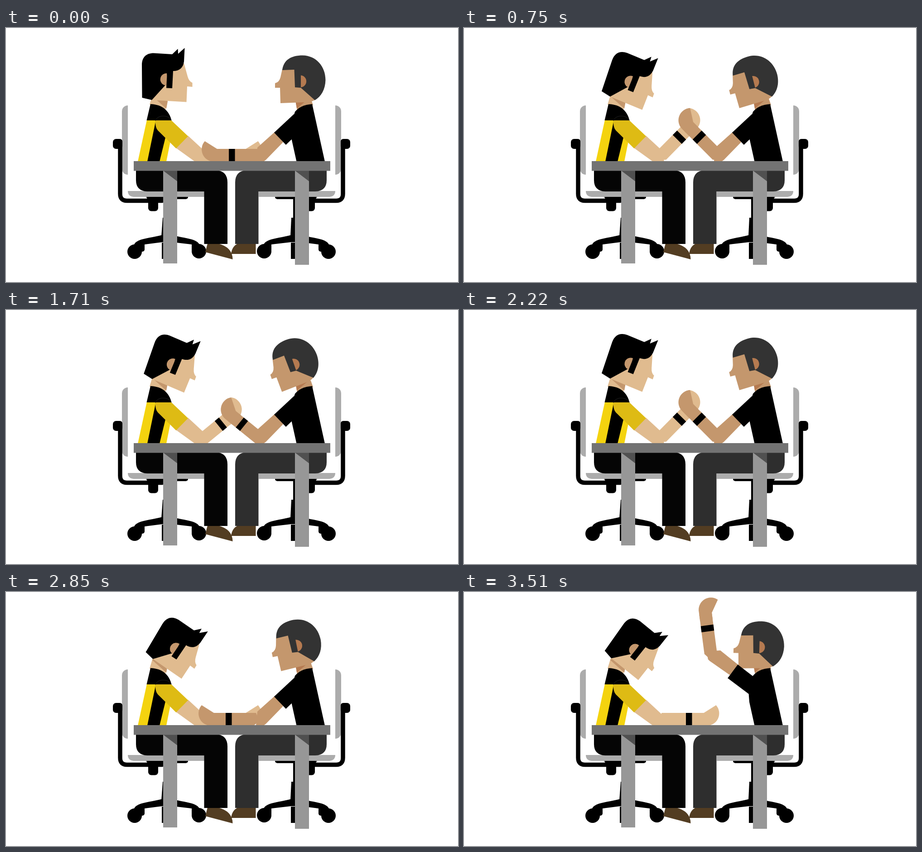
Animation of 998x561 px, one loop 3.63 s. Source, as an HTML page with a canvas:

```html
<!DOCTYPE html>
<html lang="en">
<head>
<meta charset="utf-8">
<title>Arm wrestling</title>
<style>
  html, body { margin: 0; width: 100%; height: 100%; overflow: hidden; background: #fff; }
  canvas { display: block; width: 100%; height: 100%; }
</style>
</head>
<body>
<canvas id="stage" width="998" height="561"></canvas>
<script>
const ctx = document.getElementById('stage').getContext('2d');
const LOOP = 3630, STEP = 30, LAST = 3510;
const BLACK = '#000', SEAT = '#acacac', SHOE = '#533d22';
const LIGHT = '#e0bb8f', TAN = '#c4976d', BROWN = '#b57a50';
const YELLOW = '#f4d30f', SLEEVE = '#debb14', GREY_HAIR = '#333';
const RAD = Math.PI / 180;
const HAND = { x: 110, y: 13 };
const SHOULDER = { x: 640, y: 203 };

const mix = (a, b, u) => a + (b - a) * u;

function ease(t, from, to) {
  const u = Math.min(1, Math.max(0, (t - from) / (to - from)));
  return u * u * (3 - 2 * u);
}

// Two fading nods while the grip is contested.
function struggle(t) {
  const u = Math.min(1, Math.max(0, (t - 1200) / 1020));
  return (1 - u) * Math.sin(2 * Math.PI * u) ** 2;
}

// Angle and length a forearm needs for its hand to meet a point dx ahead and dy above.
function reach(dx, dy) {
  return {
    lift: (Math.atan2(dy, dx) - Math.atan2(HAND.y, HAND.x)) / RAD,
    stretch: Math.hypot(dx, dy) / Math.hypot(HAND.x, HAND.y)
  };
}

function poseAt(t) {
  const lean = ease(t, 500, 755);
  const push = ease(t, 750, 1200) - ease(t, 1200, 2220);
  const sink = ease(t, 1200, 1710) - ease(t, 1710, 2220);
  const slam = ease(t, 2480, 2790);
  const raise = ease(t, 2880, 3240);
  const clasp = ease(t, 0, 660) - slam;
  const nod = struggle(t);

  const elbowY = 281 + 12 * clasp;
  const handY = mix(268, 205 + 17 * sink, clasp);
  const left = { x: 424.5, y: elbowY };
  const right = { x: 571 - 7 * slam + 10.5 * raise, y: elbowY + 5.5 * raise };
  const leftReach = reach(mix(HAND.x, 493 - left.x, clasp), elbowY - handY);
  const rightReach = reach(mix(HAND.x, right.x - 502, clasp), elbowY - handY);
  rightReach.lift += 82.5 * raise;

  return {
    leftHead: 19 * lean + 1.4 * push - 16 * nod + 16.6 * ease(t, 2450, 3060),
    leftDrop: 0.4 * lean + 2.6 * push + 1.2 * slam,
    rightHead: -14.5 * lean - 9 * push + 11 * nod + 3 * slam + 28.5 * raise - 15.4 * ease(t, 3240, LAST),
    rightDrop: push + 4 * raise,
    left: { ...left, ...leftReach },
    right: { ...right, ...rightReach },
    shoulder: 80.6 * raise
  };
}

const paths = {};
function fill(color, d) {
  ctx.fillStyle = color;
  ctx.fill(paths[d] ||= new Path2D(d));
}

function rect(color, x, y, w, h, radius = 0) {
  ctx.fillStyle = color;
  ctx.beginPath();
  ctx.roundRect(x, y, w, h, radius);
  ctx.fill();
}

function disc(x, y, r) {
  rect(BLACK, x - r, y - r, 2 * r, 2 * r, r);
}

function isolated(draw) {
  ctx.save();
  draw();
  ctx.restore();
}

function turned(x, y, degrees, dy, draw) {
  isolated(() => {
    ctx.translate(x, y + dy);
    ctx.rotate(degrees * RAD);
    ctx.translate(-x, -y);
    draw();
  });
}

function mirrored(width, draw) {
  isolated(() => {
    ctx.translate(width, 0);
    ctx.scale(-1, 1);
    draw();
  });
}

function chair() {
  rect(SEAT, 256, 171, 13, 153, [13, 0, 0, 13]);
  rect(BLACK, 236, 245, 21, 22, 7);
  ctx.strokeStyle = BLACK;
  ctx.lineWidth = 9.5;
  ctx.lineCap = 'round';
  ctx.stroke(new Path2D('M252 250V366Q252 381.5 267 381.5H345'));
  fill(SEAT, 'M269 360H438V373H282Q269 372 269 360Z');
  rect(BLACK, 310, 373, 92, 5, [0, 0, 5, 5]);
  rect(BLACK, 314, 377, 22, 27.5, [0, 0, 7, 7]);
  rect(BLACK, 350, 373, 12, 47);
  fill(BLACK, 'M346 419H366L368 460H343Z');
  rect(BLACK, 344, 474, 23, 36);
  fill(BLACK, 'M283 478C290 464 322 464 345 457H366C388 464 420 464 427 478H410L367 473H345L306 478Z');
  disc(284, 494, 16);
  disc(426, 493, 16);
  rect(BLACK, 284, 477, 22, 17, [0, 0, 5, 0]);
  rect(BLACK, 410, 477, 16, 17, [0, 0, 0, 5]);
}

function legs(color) {
  fill(color, 'M287 314H464Q489 316 489 341V477H437.5V361H312Q287 360 287 336Z');
}

function table() {
  for (const [x, bottom] of [[347, 520], [638, 523]]) {
    rect('#979797', x, 315, 31, bottom - 315);
    fill('#505050', `M${x} 315h31v23.5Z`);
  }
  rect('#737373', 282, 294, 434, 21.5);
}

function leftTorso() {
  fill(LIGHT, 'M324 146L317 169L352 180L357 160Z');
  fill(TAN, 'M322.5 150L354 178L357 162L340 140Z');
  fill(YELLOW, 'M311 203H331L363 250L354 295H291Z');
  fill(BLACK, 'M331 203L352 242L339 295H312Z');
  fill(BLACK, 'M319 168C346 169 360 183 365.5 204H310.5Z');
}

function leftHead() {
  fill(LIGHT, 'M322 159L352 125L357 92L393 78L401 107Q404 118 411.5 121V130L400 129L398.5 163.5Z');
  fill(BLACK, 'M300 82C300 64 310 55.5 326 55.5L367 58L379.5 46L380 57L394.5 44L393 74C391 88 383 95 369 95H357L352 126L322 159L300.5 154Z');
  fill(TAN, 'M355 100A13.5 13.5 0 0 0 348 125.5L356 128Z');
  fill(BLACK, 'M356 94H369L367 133L354 132.5Z');
}

function rightTorso() {
  fill(TAN, 'M639 160L673 156L678 170L643 182Z');
  fill(BROWN, 'M639 160L667 157L655 167L642 178Z');
  fill(BLACK, 'M676 168L704 295H641.5L630 243L628 217L638 185Q650 170 676 168Z');
}

function rightHead() {
  fill(TAN, 'M610 91H638L652 130L682 159L672 163.5L606 166L605 132H594V122Q603 120 606 109Z');
  fill(GREY_HAIR, 'M610 93C613 70 630 60.5 655 60.5C685 61 705.5 85 705.5 115C705 136 696 151 682 159.5L651 132L638 131L636.5 92Z');
  fill(BROWN, 'M651 104.5A13.3 13.3 0 0 1 651 131Z');
}

function forearm(skin, { x, y, lift, stretch }, flip) {
  isolated(() => {
    ctx.translate(x, y);
    ctx.scale(flip, 1);
    ctx.rotate(-lift * RAD);
    isolated(() => {
      ctx.scale(stretch, 1);
      fill(skin, 'M12 -14H105V14H17L5 4Z');
      rect(BLACK, 65.5, -14, 13.5, 28);
    });
    ctx.translate(HAND.x * (stretch - 1), 0);
    fill(skin, 'M90 -14H105L132 -31A27 27 0 0 1 110 14H90Z');
  });
}

function leftArm(pose) {
  fill(LIGHT, 'M402 238L436 269.5L442 295H417L374 264Z');
  forearm(LIGHT, pose.left, 1);
  fill(SLEEVE, 'M330 204H365L402 239L375.5 266L335 226Q329 219 330 204Z');
  ctx.strokeStyle = '#222';
  ctx.lineWidth = 1;
  ctx.stroke(new Path2D('M330 205C333 191 360 191 365 204'));
}

function rightArm({ right, shoulder }) {
  const cos = Math.cos(shoulder * RAD), sin = Math.sin(shoulder * RAD);
  const dx = right.x - SHOULDER.x, dy = right.y - SHOULDER.y;
  const elbow = {
    x: SHOULDER.x + dx * cos - dy * sin,
    y: SHOULDER.y + dx * sin + dy * cos
  };
  turned(SHOULDER.x, SHOULDER.y, shoulder, 0, () => {
    fill(TAN, 'M593 230L612 252L574 291L570 294H552L555 264Z');
    fill(BLACK, 'M592 231L636 190L662 216L618 258Z');
  });
  forearm(TAN, { ...right, ...elbow }, -1);
}

function draw(t) {
  const pose = poseAt(t);
  ctx.fillStyle = '#fff';
  ctx.fillRect(0, 0, 998, 561);

  chair();
  mirrored(996, chair);
  fill(SHOE, 'M445 476H468Q500 484 500.5 511L440 495Z');
  fill(SHOE, 'M512 476H551.5V499H497Q499 482 512 476Z');
  legs('#050505');
  mirrored(995, () => legs('#2e2e2e'));

  leftTorso();
  turned(345.7, 157, pose.leftHead, pose.leftDrop, leftHead);
  rightTorso();
  turned(650, 163.5, pose.rightHead, pose.rightDrop, rightHead);
  leftArm(pose);
  rightArm(pose);
  table();
}

function tick() {
  const t = performance.now() % LOOP;
  draw(Math.min(LAST, Math.floor(t / STEP) * STEP));
  requestAnimationFrame(tick);
}
tick();
</script>
</body>
</html>
```
